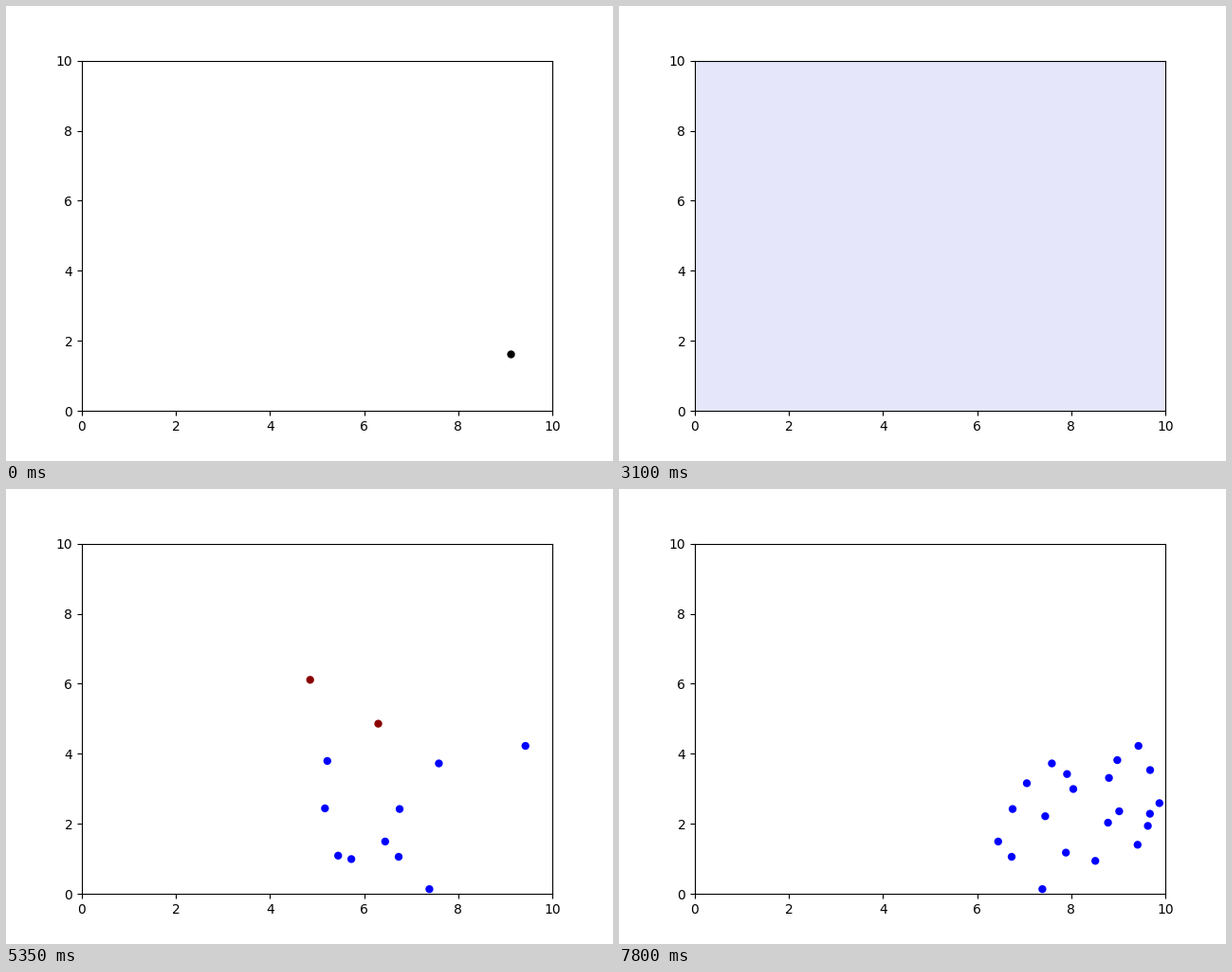
Recreate the animation shown at these times as a matplotlib script. Size 640 px wide and 480 px high, loop 8000 ms.

```python
import random

import matplotlib.pyplot as plt
import numpy as np
from matplotlib.animation import FuncAnimation

STEP = 50      # ms per frame
FRAMES = 160
LIFE = 20      # frames a node stays lit

# Node positions in pixels, grouped by hops from the first node
START = [(532.4, 367.4)]
RING1 = [(560, 296.5), (516.6, 304.8), (479, 316.5), (449.4, 345.2),
         (527.4, 340), (515.6, 352), (559.8, 342.6), (557.6, 355.4),
         (569.8, 331.4), (546.8, 375.3), (502.2, 392.3), (471.2, 383.6)]
RING2 = [(472.4, 300.7), (430, 310.4), (525.4, 286),
         (547.7, 271), (456.4, 289.5), (415, 337.6), (399.8, 371.9),
         (414, 388), (446.4, 422.1)]
RING3 = [(392.5, 247.6), (338.8, 286.9), (336.3, 336.9), (350.2, 386.8),
         (364.1, 390.4)]
RING4 = [(320.7, 201.3), (366, 243.4), (399.2, 222.9), (261.5, 300),
         (265.8, 324.6), (277.6, 326.9), (289, 347.7), (299.4, 304),
         (264.6, 380), (281, 387.8), (287.4, 387.2), (300.2, 426)]
GOAL = [(334.9, 153.2)]
RELAY = RING4[:1]

# (nodes, first frame, number of frames over which they light up)
WAVES = [
    (START, 1, 1), (RING1, 9, 2), (RING2, 18, 2), (RING3, 26, 2),
    (RING4, 34, 3), (GOAL, 42, 1),
    (START, 70, 1), (RING1, 78, 3), (RING2, 87, 2), (RING3, 95, 3),
    (RELAY, 102, 1), (GOAL, 108, 1),
    (START, 136, 1), (RING1, 144, 3), (RING2, 153, 2),
]
FLASHES = [(42, 70), (102, 107), (108, 136)]
LEARNED = {RING4[0]: 42, RING3[0]: 102}   # when a node becomes a known relay

rng = random.Random(4)


def delay(nodes, k, steps):
    if nodes is RING2:
        return int(k >= 3)
    return k if k < steps else rng.randrange(steps)


EVENTS = [(node, first + delay(nodes, k, steps))
          for nodes, first, steps in WAVES
          for k, node in enumerate(nodes)]


def to_data(node):
    x, y = node
    return (x - 80) / 49.6, (427.2 - y) / 36.96


def color(node, i):
    if node in START + GOAL:
        return "black"
    if i >= LEARNED.get(node, FRAMES):
        return "darkred"
    return "blue"


fig, ax = plt.subplots(figsize=(6.4, 4.8), dpi=100)
ax.set_xlim(0, 10)
ax.set_ylim(0, 10)
dots = ax.scatter([], [], s=20, linewidths=1.5)


def draw(i):
    i = max(i, 1)
    lit = [node for node, t in EVENTS if t <= i < t + LIFE]
    dots.set_offsets(np.array([to_data(n) for n in lit]).reshape(-1, 2))
    dots.set_color([color(n, i) for n in lit])
    flash = any(a <= i < b for a, b in FLASHES)
    ax.set_facecolor("lavender" if flash else "white")
    return [dots]


anim = FuncAnimation(fig, draw, frames=FRAMES, interval=STEP, repeat=True,
                     repeat_delay=0, init_func=lambda: draw(0), blit=False)
plt.show()
```
